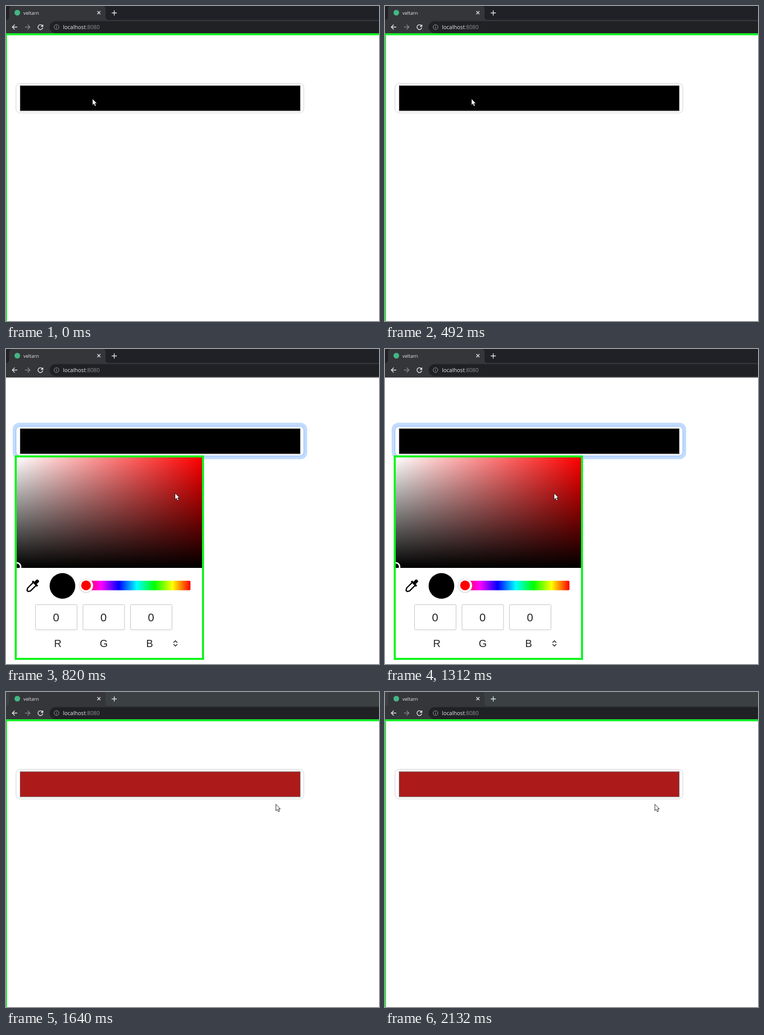
An HTML page for the animation above (2460 ms loop, 727 by 613 pixels).

```html
<!DOCTYPE html>
<html lang="en">
<head>
<meta charset="utf-8">
<style>
  html, body { margin: 0; width: 100%; height: 100%; overflow: hidden; background: #fff; }
  svg { display: block; }
  .ui { font-family: "Open Sans", "Noto Sans", sans-serif; }
  .picker text { font-family: "Liberation Sans", Arial, sans-serif; text-anchor: middle; fill: #222; }
  .line { fill: none; stroke: #e8eaed; stroke-width: 1.4; }
</style>
</head>
<body>
<svg width="727" height="613" viewBox="0 0 727 613">
  <defs>
    <linearGradient id="tint"><stop stop-color="#fff"/><stop offset="1" stop-color="#f00"/></linearGradient>
    <linearGradient id="shade" x2="0" y2="1"><stop stop-opacity="0"/><stop offset="1"/></linearGradient>
    <linearGradient id="hue">
      <stop stop-color="#f00"/><stop offset=".167" stop-color="#f0f"/><stop offset=".333" stop-color="#00f"/>
      <stop offset=".5" stop-color="#0ff"/><stop offset=".667" stop-color="#0f0"/>
      <stop offset=".833" stop-color="#ff0"/><stop offset="1" stop-color="#f00"/>
    </linearGradient>
    <clipPath id="area"><path d="M21 211H382V426H21Z"/></clipPath>
  </defs>

  <!-- browser bar -->
  <g class="ui">
    <rect id="strip" width="727" height="28"/>
    <path fill="#35363a" d="M0 27Q6 27 6 21V6Q6 0 12 0H188Q194 0 194 6V21Q194 27 200 27H727V55.500H0Z"/>
    <rect x="85" y="29.500" width="670" height="23.500" rx="11.750" fill="#202124"/>
    <circle cx="22" cy="13" r="5.500" fill="#41b883"/>
    <text x="34" y="16.500" font-size="9.300" fill="#e8eaed">veltarn</text>
    <path class="line" d="M178 10l6 6m0-6l-6 6M206 13.500h10M211 8.500v10"/>
    <path class="line" d="M22 41H12.500M17 36.300L12.300 41L17 45.700"/>
    <path class="line" stroke-opacity=".45" d="M37 41h9.500M42 36.300L46.700 41L42 45.700"/>
    <path class="line" d="M70.800 38.200A4.700 4.700 0 1 0 71.700 42"/>
    <path fill="#e8eaed" d="M72.500 35.500v5h-5Z"/>
    <g class="line" style="stroke:#9aa0a6;stroke-width:1"><circle cx="98.500" cy="41" r="4.600"/><path d="M98.500 40.500v3M98.500 38.300v1.100"/></g>
    <text x="111" y="45" font-size="10.600" fill="#e8eaed">localhost<tspan fill="#8c9196">:8080</tspan></text>
  </g>

  <!-- colour field -->
  <rect id="glow" x="13" y="143.500" width="574" height="71" rx="13" fill="#c2dbfe"/>
  <rect id="field" x="19.500" y="150.500" width="561" height="57.500" rx="8" fill="#fff"/>
  <rect id="swatch" x="27.500" y="155" width="546" height="49" stroke="#777"/>
  <rect id="pageFrame" x="0" y="55" width="740" height="570" fill="none" stroke="#16ee2b" stroke-width="4"/>

  <!-- colour picker -->
  <g id="picker" class="picker">
    <rect x="19" y="209" width="365" height="394" fill="#fff" stroke="#0cf51c" stroke-width="4"/>
    <g clip-path="url(#area)">
      <path fill="url(#tint)" d="M21 211H382V426H21Z"/>
      <path fill="url(#shade)" d="M21 211H382V426H21Z"/>
      <circle cx="21" cy="423.500" r="7.500" fill="#000" stroke="#fff" stroke-width="3"/>
    </g>
    <g transform="translate(52 461) rotate(45)">
      <path d="M-3.200-14.500Q0-17.500 3.200-14.500V-8H7V-4.500H-7V-8H-3.200Z"/>
      <path fill="none" stroke="#000" stroke-width="2.400" d="M-4-5V10L-1.500 14H1.500L4 10V-5"/>
    </g>
    <circle cx="110" cy="461" r="25"/>
    <rect x="150" y="451" width="209.500" height="18.500" rx="2" fill="url(#hue)"/>
    <circle cx="156" cy="460.500" r="14" fill="#d5d5d5"/>
    <circle cx="156" cy="460" r="13" fill="#fff"/>
    <circle cx="156" cy="460" r="9.500" fill="#f00"/>
    <g id="channels"></g>
    <path fill="none" stroke="#222" stroke-width="1.600" d="M326.500 571.500l3.700-3.700l3.700 3.700M326.500 574.500l3.700 3.700l3.700-3.700"/>
  </g>

  <path id="cursor" fill="#fff" stroke="#222" stroke-width="1" d="M.5.500V13L3.300 10.400L5.300 15L7.600 14L5.600 9.600H9.200Z"/>
</svg>
<script>
const STEP = 820;
const scenes = [
  { strip: "#202126", swatch: "#000", cursor: [168, 180] },
  { strip: "#202126", swatch: "#000", cursor: [329, 280], open: true },
  { strip: "#3b4043", swatch: "#ad1a1a", cursor: [525.5, 218] }
];
const el = id => document.getElementById(id);
const set = (id, name, value) => el(id).setAttribute(name, value);
const show = (id, on) => set(id, "visibility", on ? "visible" : "hidden");

el("channels").innerHTML = ["R", "G", "B"].map((name, i) => {
  const x = 57.5 + i * 92.5;
  return `<rect x="${x}" y="497.500" width="81" height="49" rx="2" fill="#fff" stroke="#bcc3bc"/>
    <text x="${x + 40}" y="529.500" font-size="22">0</text>
    <text x="${101 + i * 89.5}" y="579.500" font-size="20">${name}</text>`;
}).join("");

function draw(now) {
  const scene = scenes[Math.floor(now / STEP) % scenes.length];
  set("strip", "fill", scene.strip);
  set("swatch", "fill", scene.swatch);
  set("field", "stroke", scene.open ? "#86b7fe" : "#ced0d2");
  set("cursor", "transform", `translate(${scene.cursor})`);
  show("glow", scene.open);
  show("picker", scene.open);
  show("pageFrame", !scene.open);
}

const start = performance.now();
function tick() {
  draw(performance.now() - start);
  requestAnimationFrame(tick);
}
tick();
</script>
</body>
</html>
```
